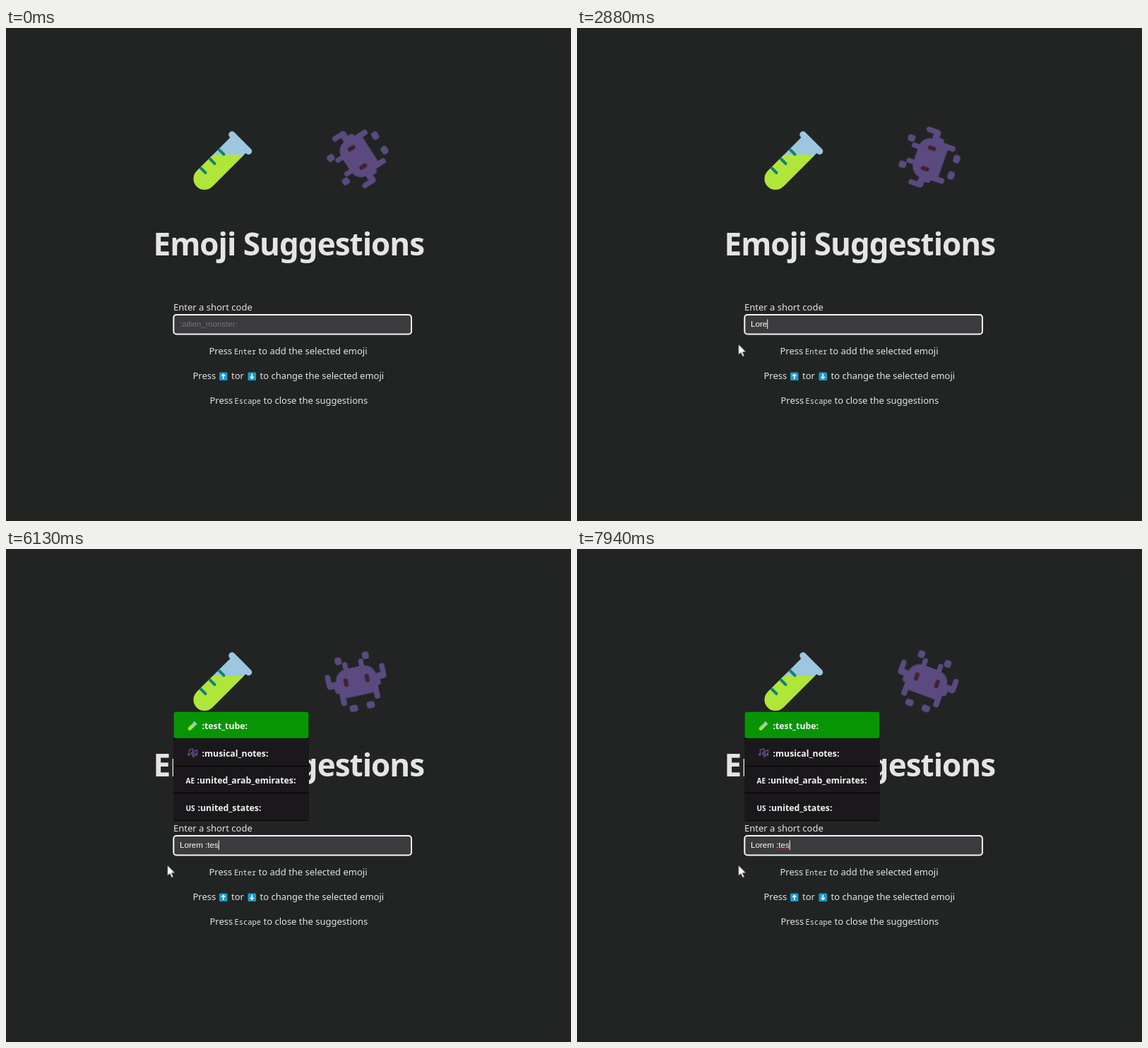
Recreate the animation shown at these times as an HTML page. Size 800 by 698 pixels, loop 8000 ms.

```html
<!DOCTYPE html>
<html lang="en">
<head>
<meta charset="utf-8">
<title>Emoji Suggestions</title>
<style>
  html, body { margin: 0; width: 100%; height: 100%; overflow: hidden; background: #222424; }
  svg { display: block; width: 100%; height: 100%; }
  text { font: 13px "Noto Sans", sans-serif; fill: #e4e4e4; white-space: pre; }
  .title { font-size: 44px; font-weight: 700; letter-spacing: -1px; }
  .key { font: 500 10.4px "Noto Sans Mono", monospace; }
  .field text { font: 11.6px "Liberation Sans", Arial, sans-serif; fill: #fdfdf2; }
  .field .hint { fill: #757575; }
  .popup text { font-size: 12.3px; font-weight: 700; fill: #f4f4f4; }
  .popup .flag { font-size: 10px; font-weight: 600; }

  .alien, .pointer, .popup, .picked, .typo { animation: 8s linear infinite; }
  .alien { animation-name: spin; }
  .pointer { animation-name: enter; }
  .popup { animation-name: open; animation-timing-function: step-end; }
  .picked { animation-name: pick; animation-timing-function: step-end; }
  .typo { animation-name: flag; animation-timing-function: step-end; }

  @keyframes spin {
    from { transform: translate(496px, 184.2px) rotate(-122.8deg); }
    to { transform: translate(496px, 184.2px) rotate(21.2deg); }
  }
  @keyframes enter {
    0%, 4.99% { transform: translate(28px, 500px); opacity: 0; }
    5% { transform: translate(28px, 500px); opacity: 1; animation-timing-function: ease-out; }
    11%, 100% { transform: translate(228.5px, 447.5px); opacity: 1; }
  }
  @keyframes open { 0% { visibility: hidden; } 69.5%, 100% { visibility: visible; } }
  @keyframes pick {
    0% { transform: none; }
    84.4% { transform: translateY(38.7px); }
    94.4%, 100% { transform: none; }
  }
  @keyframes flag { 0% { opacity: 0; } 84%, 100% { opacity: 1; } }
</style>
</head>
<body>
<svg viewBox="0 0 800 698">
  <defs>
    <g id="tube">
      <path fill="#9dc6e0" d="M270 202.5 319 153.500 341 175.500 292 224.500Z"/>
      <path fill="#b0e53a" d="M270 202.500 292.500 180Q314 178 336.500 180L292 224.500A15.550 15.550 0 0 1 270 202.500Z"/>
      <path stroke="#9dc6e0" stroke-width="9.500" stroke-linecap="round" d="M320 151 343.500 174.500"/>
      <path stroke="#108573" stroke-width="4" stroke-linecap="round"
            d="M302 172.500l6.500 6.500M289 185.500l6.500 6.500M276 198.500l6.500 6.500"/>
    </g>
    <g id="half">
      <path d="M-.5-17H8V-24Q8-27 11.500-27T15-24V-16.500C23-15 28-9 28.500-2.500H35.500V-11Q36-14.500 39.500-14.500T43-11V2Q43 7 38 7H33V11Q33 15 28 15V30Q28 33.500 24 33.500T20 30V23.500H-.5Z"/>
      <rect x="15" y="-35.500" width="9.500" height="10.500" rx="3.500"/>
      <rect x="6.500" y="35" width="11.500" height="9.500" rx="4"/>
      <rect x="12.300" y="-4.300" width="6" height="12" rx="3" fill="#44212c"/>
    </g>
    <g id="arrow">
      <rect width="11.500" height="11.500" rx="1.500" fill="#189cc8"/>
      <path fill="none" stroke="#fff" stroke-width="1.600" d="M5.750 9.500V3M3.200 5.300 5.750 2.800 8.300 5.300"/>
    </g>
  </defs>

  <rect width="800" height="698" fill="#222424"/>
  <use href="#tube"/>
  <g class="alien" fill="#5a4a80">
    <use href="#half"/>
    <use href="#half" transform="scale(-1 1)"/>
  </g>

  <text class="title" x="208.500" y="322">Emoji Suggestions</text>
  <text x="237" y="400">Enter a short code</text>

  <text x="287.500" y="462">Press</text>
  <text x="323" y="462" class="key">Enter</text>
  <text x="357.500" y="462">to add the selected emoji</text>

  <text x="264.500" y="497">Press</text>
  <use href="#arrow" x="302" y="487.500"/>
  <text x="319" y="497">tor</text>
  <use href="#arrow" transform="translate(342.500 499) scale(1 -1)"/>
  <text x="359.500" y="497">to change the selected emoji</text>

  <text x="288.500" y="532">Press</text>
  <text x="323.500" y="532" class="key">Escape</text>
  <text x="364.500" y="532">to close the suggestions</text>

  <g class="field">
    <rect x="237.300" y="406" width="336.700" height="27.500" rx="4" fill="#3b3a3d" stroke="#f6f6f6" stroke-width="2"/>
    <text class="hint" id="hint" x="246" y="423">:ailien_monster:</text>
    <text id="typed" x="246" y="423"></text>
    <path class="typo" stroke="#a8262a" stroke-width="1.500" stroke-dasharray="2 1" d="M284 425H300"/>
    <rect id="caret" y="412.500" width="1" height="13.500" fill="#fff"/>
  </g>

  <g class="popup">
    <rect x="237" y="230" width="192" height="154.500" rx="4" fill="#1a181b"/>
    <path stroke="#000" d="M237 268.500H429M237 307.500H429M237 345.500H429M238 384.500H428"/>
    <rect class="picked" x="237.500" y="230.500" width="191" height="37.500" rx="3" fill="#089504" stroke="#064d08" stroke-dasharray="1 1"/>
    <use href="#tube" transform="translate(216 220.800) scale(.157)"/>
    <text x="277.500" y="255">:test_tube:</text>
    <g fill="#5a4a80" stroke="#5a4a80" stroke-width="1.500">
      <path fill="none" d="M259.500 291V284L264.500 283V289M266.500 292V286L270.500 284.500V290"/>
      <circle cx="258.800" cy="291" r="1.200"/><circle cx="263.500" cy="289.500" r="1.200"/>
      <circle cx="265.500" cy="293" r="1.200"/><circle cx="269.500" cy="291" r="1.200"/>
    </g>
    <text x="277.500" y="293.500">:musical_notes:</text>
    <text class="flag" x="254.500" y="332">AE</text>
    <text x="270.500" y="332">:united_arab_emirates:</text>
    <text class="flag" x="254.500" y="371">US</text>
    <text x="271.500" y="371">:united_states:</text>
  </g>

  <path class="pointer" fill="#fff" stroke="#111" stroke-width=".8"
        d="M0 0V15.500L3.500 12.300 6 18 8.600 16.900 6.200 11.300H11Z"/>
</svg>
<script>
  const LOOP = 8000, BLINK = 530;
  const message = "Lorem :tes";
  const keyTimes = [2250, 2450, 2640, 2820, 3050, 4300, 4420, 5380, 5560, 5770];
  const [hint, typed, caret] = ["hint", "typed", "caret"].map(id => document.getElementById(id));
  const spin = document.querySelector(".alien").getAnimations()[0];
  let shown = -1;

  function draw(now) {
    // Share the clock of the CSS animations so that typing stays in step.
    const t = (spin?.currentTime ?? now) % LOOP;
    const count = keyTimes.filter(time => time <= t).length;
    if (count !== shown) {
      shown = count;
      typed.textContent = message.slice(0, count);
      hint.style.display = count ? "none" : "";
      caret.setAttribute("x", 246 + (count ? typed.getComputedTextLength() : 0));
    }
    const since = t - (count ? keyTimes[count - 1] : -BLINK - 20);
    caret.style.opacity = since % (2 * BLINK) < BLINK ? 1 : 0;
    requestAnimationFrame(draw);
  }
  requestAnimationFrame(draw);
</script>
</body>
</html>
```
